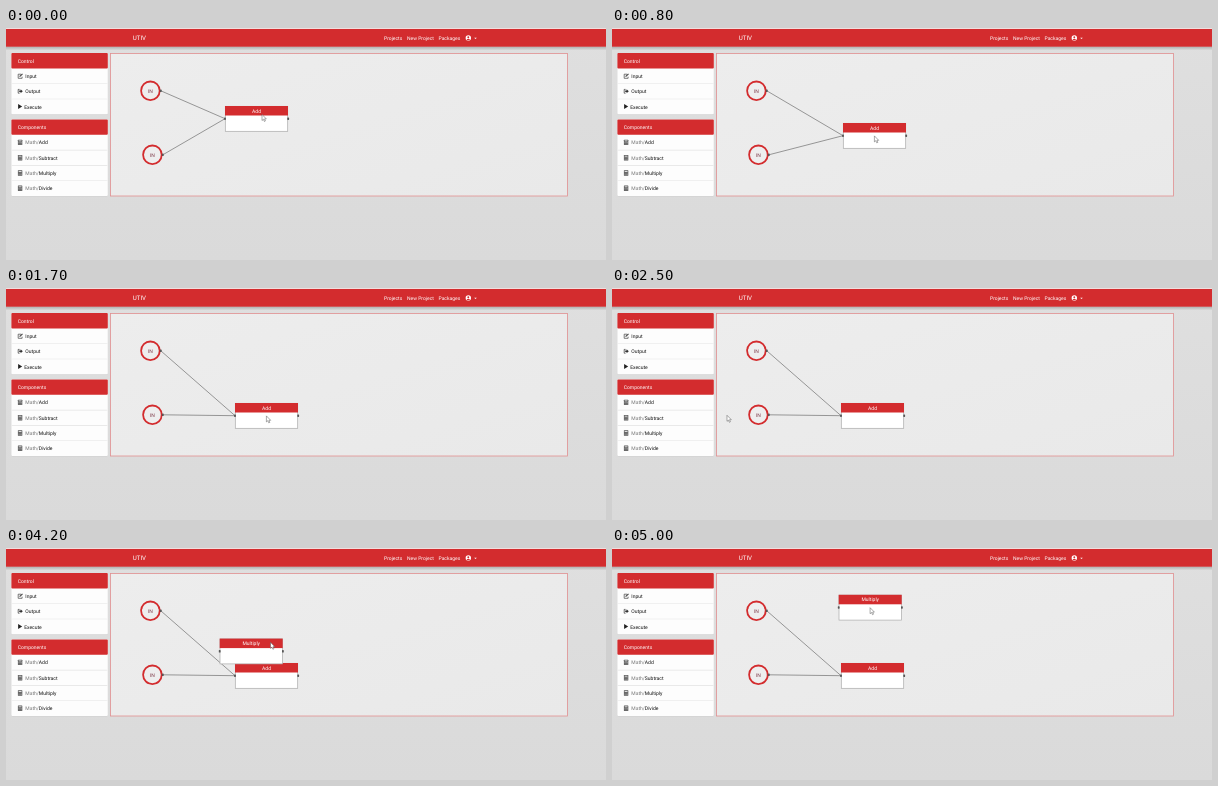
Recreate the animation shown at these times as an HTML page. Size 600 by 232 pixels, loop 5.1 s.

```html
<!DOCTYPE html>
<html lang="en">
<head>
<meta charset="utf-8">
<title>Node editor</title>
<style>
  html, body { margin: 0; width: 100%; height: 100%; overflow: hidden; background: #dcdcdc; }
  svg { display: block; width: 100vw; height: 100vh; }
  text { font: 5px Roboto, sans-serif; text-rendering: geometricPrecision; }
  .mid { text-anchor: middle; }
  .light { fill: #fff; }
</style>
</head>
<body>
<svg id="stage" viewBox="0 0 600 232" xmlns="http://www.w3.org/2000/svg">
  <defs>
    <linearGradient id="page" x2="0" y2="1">
      <stop stop-color="#dfdfdf"/><stop offset="1" stop-color="#dadada"/>
    </linearGradient>
    <linearGradient id="panel" x2="1" y2="1">
      <stop stop-color="#ededed"/><stop offset="1" stop-color="#e9e9e9"/>
    </linearGradient>
    <linearGradient id="shade" x2="0" y2="1">
      <stop stop-color="#000" stop-opacity=".22"/><stop offset="1" stop-color="#000" stop-opacity="0"/>
    </linearGradient>
    <g id="edit" fill="none" stroke="#444" stroke-width=".7">
      <path d="M3.4 .9H.6V5H4.5V3.4"/><path d="M2 3.4L4.9 .5" stroke-width="1.1"/>
    </g>
    <g id="exit">
      <path d="M2 .8H.6V4.6H2" fill="none" stroke="#333" stroke-width=".7"/>
      <path d="M1.6 2H3V.7L5.2 2.7L3 4.7V3.4H1.6Z" fill="#333"/>
    </g>
    <path id="play" d="M.5 .2L4.6 2.7L.5 5.2Z" fill="#222"/>
    <g id="calc">
      <rect x=".3" width="4.4" height="5.4" rx=".5" fill="#555"/>
      <path d="M1 1.2H4" stroke="#eee" stroke-width=".9"/>
      <path d="M1 2.8H4M1 4.3H4" stroke="#ddd" stroke-width=".7" stroke-dasharray=".7 .45"/>
    </g>
  </defs>
  <rect width="600" height="232" fill="url(#page)"/>
  <rect y="18.5" width="600" height="4" fill="url(#shade)"/>
  <rect width="600" height="1.2" fill="#f0dede"/>
  <rect y="1" width="600" height="17.7" fill="#d32c2e"/>
  <g class="light">
    <text x="126.7" y="12.4" style="font-size:6.2px">UTIV</text>
    <text x="378" y="12">Projects</text>
    <text x="401" y="12">New Project</text>
    <text x="432.5" y="12">Packages</text>
    <circle cx="462.3" cy="10" r="2.7"/>
    <path d="M468.2 9.7H470.8L469.5 11Z"/>
  </g>
  <g fill="#d32c2e">
    <circle cx="462.3" cy="9.2" r=".95"/>
    <path d="M460.5 11.7Q462.3 9.9 464.1 11.7Q462.3 13 460.5 11.7Z"/>
  </g>
  <g id="menu"></g>
  <rect x="104.5" y="25.5" width="457" height="142.5" fill="url(#panel)" stroke="#e08e90" stroke-width=".8"/>
  <g id="graph"></g>
</svg>
<script>
const RED = '#d32c2e', LOOP = 5100, STEP = 100, ROW = 15.3;

function add(parent, tag, attrs, text) {
  const el = document.createElementNS('http://www.w3.org/2000/svg', tag);
  for (const k in attrs) el.setAttribute(k, attrs[k]);
  if (text) el.textContent = text;
  parent.appendChild(el);
  return el;
}

const menu = document.getElementById('menu');
const graph = document.getElementById('graph');

function card(y, title, rows) {
  const box = { x: 5.4, width: 96.4, rx: 1 };
  const height = ROW * (rows.length + 1);
  add(menu, 'rect', { ...box, y: y + .5, height, fill: '#cfcfcf' });
  add(menu, 'rect', { ...box, y, height, fill: '#fdfdfd' });
  add(menu, 'rect', { ...box, y, height: ROW, fill: RED });
  add(menu, 'text', { x: 11.7, y: y + 9.5, class: 'light' }, title);
  rows.forEach(([icon, label, group], i) => {
    const top = y + ROW * (i + 1);
    if (i) add(menu, 'rect', { ...box, y: top - .3, height: .6, fill: '#e4e4e4' });
    add(menu, 'use', { href: '#' + icon, transform: `translate(11.6 ${top + 4.9})` });
    const text = add(menu, 'text', { x: icon === 'play' ? 18.2 : 19.3, y: top + 9.5 });
    if (group) add(text, 'tspan', { fill: '#777' }, group + '/');
    add(text, 'tspan', { fill: '#111' }, label);
  });
}

card(25.1, 'Control', [['edit', 'Input'], ['exit', 'Output'], ['play', 'Execute']]);
card(91.5, 'Components', ['Add', 'Subtract', 'Multiply', 'Divide'].map(n => ['calc', n, 'Math']));

const port = (parent, x, y) =>
  add(parent, 'rect', { x: x - .9, y: y - 1.2, width: 1.8, height: 2.4, rx: .6, fill: '#555' });

function input(x, y) {
  add(graph, 'circle', { cx: x, cy: y, r: 9.3, fill: '#eee', stroke: RED, 'stroke-width': 1.8 });
  add(graph, 'text', { x, y: y + 1.8, class: 'mid', fill: '#7d3a48' }, 'IN');
  port(graph, x + 10.4, y);
  return { x: x + 10.4, y, line: add(graph, 'path', { stroke: '#666', 'stroke-width': .65 }) };
}

function block(name) {
  const g = add(graph, 'g', {});
  add(g, 'rect', { x: .3, y: .3, width: 62.4, height: 25, fill: '#fff', stroke: '#aaa', 'stroke-width': .7 });
  add(g, 'rect', { width: 63, height: 9.5, fill: RED });
  add(g, 'text', { x: 31.5, y: 6.5, class: 'mid light' }, name);
  port(g, 0, 12.7);
  port(g, 63.2, 12.7);
  return g;
}

const inputs = [input(144.4, 62.8), input(146.4, 126.8)];
const sum = block('Add');
const multiply = block('Multiply');
const cursor = add(graph, 'path', {
  d: 'M0 0V6L1.4 4.8L2.4 7L3.4 6.5L2.5 4.4H4.3Z',
  fill: '#fff', stroke: '#555', 'stroke-width': .5, 'stroke-linejoin': 'round'
});

// Key points are [time, x, y].
const DROP = 3400, GRAB = 4200, RELEASE = 2400;
const sumPath = [[100, 219, 78], [800, 231, 95], [1300, 229, 108], [1700, 229, 115]];
const multiplyPath = [[GRAB, 213.7, 90.6], [4800, 231, 48], [5000, 226.7, 46.8]];
const hoverPath = [[0, 256, 86.5], [RELEASE, 260, 128], [2500, 115, 127.3],
  [3000, 45.5, 146], [DROP, 215, 113], [GRAB, 264.5, 94.3]];

const ramp = (t, a, b) => Math.min(1, Math.max(0, (t - a) / (b - a)));
const easeOut = u => 1 - (1 - u) ** 3;
const mix = (p, q, u) => p.map((v, i) => v + (q[i] - v) * u);
const grip = ([x, y]) => [x + 31.4, y + 12.9];

function along(path, t, ease = u => u) {
  const i = Math.max(1, path.findIndex(k => k[0] >= t));
  const last = t > path[path.length - 1][0] ? path.length - 1 : i;
  const [a, ...p] = path[last - 1], [b, ...q] = path[last];
  return mix(p, q, ease(ramp(t, a, b)));
}

const place = (el, [x, y]) => el.setAttribute('transform', `translate(${x} ${y})`);

function draw(ms) {
  const t = Math.floor(ms % LOOP / STEP) * STEP;
  const s = along(sumPath, t), m = along(multiplyPath, t);
  place(sum, s);
  place(multiply, m);
  multiply.setAttribute('visibility', t >= DROP ? 'visible' : 'hidden');
  for (const p of inputs) p.line.setAttribute('d', `M${p.x} ${p.y}L${s[0]} ${s[1] + 12.7}`);

  // The pointer hovers freely, then settles on the block it drags.
  const hover = along(hoverPath, t, easeOut);
  place(cursor, t < RELEASE
    ? mix(hover, grip(s), ramp(t, 0, 300))
    : mix(hover, grip(m), ramp(t, GRAB, GRAB + 300)));
}

const start = performance.now();
function tick() {
  draw(performance.now() - start);
  requestAnimationFrame(tick);
}
tick();
</script>
</body>
</html>
```
